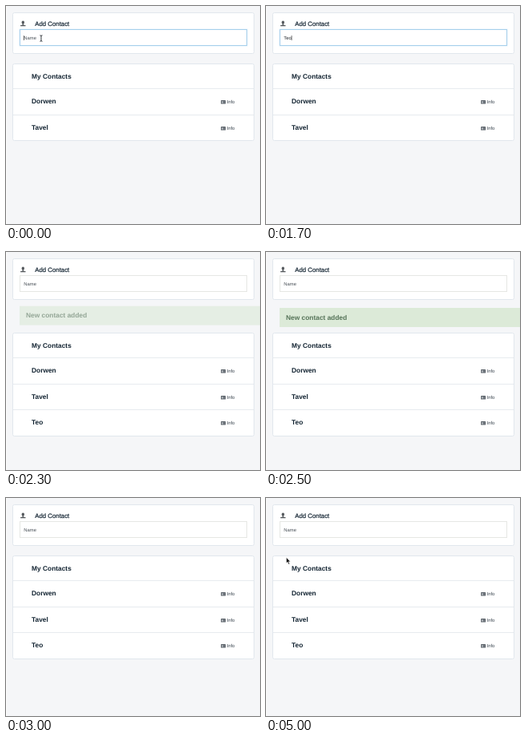
Recreate the animation shown at these times as an HTML page. Size 318 by 273 pixels, loop 5100 ms.

```html
<!DOCTYPE html>
<html lang="en">
<head>
<meta charset="utf-8">
<title>Add contact</title>
<style>
  html, body { margin: 0; width: 100%; height: 100%; overflow: hidden; background: #f5f6f8; }
  svg { display: block; width: 318px; height: 273px; }
  text { font-family: "Liberation Sans", Arial, sans-serif; fill: #132432; text-rendering: geometricPrecision; }
  .bold { font-size: 8.4px; font-weight: 700; }
  .small { font-size: 5.9px; fill: #3c4650; }
  .card { fill: #fff; stroke: #e1e7ed; }
  .rule { stroke: #e7ebef; }
</style>
</head>
<body>
<svg viewBox="0 0 318 273">
  <defs>
    <g id="info">
      <rect x="269" y="118" width="6" height="4.6" rx=".4" fill="#596067"/>
      <path d="M270 119.4h1.6v1.9h-1.6zM272.4 119.7h1.8M272.4 121.100h1.8" fill="#b4babf" stroke="#c8cdd2" stroke-width=".4"/>
      <text class="small" x="276.500" y="122.400">Info</text>
    </g>
  </defs>
  <rect width="318" height="273" fill="#f5f6f8"/>
  <rect width="1" height="273" fill="#fcfcfc"/>

  <rect class="card" x="8.500" y="8.500" width="302" height="51" rx="2"/>
  <ellipse cx="21.300" cy="20.600" rx="1.700" ry="2" fill="#55595d"/>
  <path d="M20.700 22h1.200l.3 1.900h2.300v1.300h-6.400v-1.300h2.300z" fill="#55595d"/>
  <text x="36.300" y="24.900" font-size="7.800" stroke="#132432" stroke-width=".2">Add Contact</text>
  <rect id="glow" x="17.500" y="29.500" width="284" height="20" fill="none" stroke="#a9d6f5" stroke-width="2" opacity=".3"/>
  <rect id="field" x="17.500" y="29.500" width="284" height="20" fill="#fff"/>
  <text id="value" class="small" x="22.300" y="41.900"></text>
  <path id="caret" d="M0 37v6" stroke="#333" stroke-width=".7"/>

  <g id="banner">
    <rect x="17" y="70" width="301" height="24" fill="#dcead8"/>
    <text class="bold" x="25" y="84.600" style="fill:#557358">New contact added</text>
  </g>

  <g id="list">
    <rect id="panel" class="card" x="8.500" y="72.500" width="302" rx="2"/>
    <text class="bold" x="32" y="91.100">My Contacts</text>
    <g id="rows"></g>
  </g>

  <path id="beam" d="M42.500 36.700q1.500 0 1.500 1 0-1 1.500-1M44 37.500v6M42.500 44.300q1.500 0 1.500-1 0 1 1.500 1" fill="none" stroke="#20262c" stroke-width=".9"/>
  <path id="arrow" d="M25.500 74.600v7l1.600-1.500 1.200 2.800 1.200-.5-1.200-2.700h2.100z" fill="#111" stroke="#fff" stroke-width=".4"/>
</svg>
<script>
const LOOP = 5100, STEP = 100;
const KEYS = [1200, 1400, 1600];
const SENT = 1900, ADDED = 2100, CLEARED = 3000;
const people = ["Dorwen", "Tavel", "Teo"];
const el = id => document.getElementById(id);
const set = (id, name, v) => el(id).setAttribute(name, v);
const show = (id, on) => set(id, "visibility", on ? "visible" : "hidden");
const ramp = (t, from, to) => Math.max(0, Math.min(1, (t - from) / (to - from)));

el("rows").innerHTML = people.map((name, i) => {
  const y = Math.round(i * 32.5);
  return `<g id="row${i}" transform="translate(0 ${y})">
    <path class="rule" d="M9 103.5h301"/>
    <text class="bold" x="32" y="122">${name}</text>
    <use href="#info"/></g>`;
}).join("");

function draw(t) {
  const focused = t < SENT;
  const typed = focused ? KEYS.filter(k => t >= k).length : 0;
  const value = el("value");
  value.textContent = typed ? people[2].slice(0, typed) : "Name";
  value.style.fill = typed ? "#20262c" : "#4a5158";
  const end = typed ? 22.6 + value.getComputedTextLength() : 22.4;
  set("caret", "transform", `translate(${end} 0)`);
  show("caret", focused && (typed || t % 1000 < 500));
  show("beam", t < KEYS[0]);
  show("glow", focused);
  set("field", "stroke", focused ? "#a6cfeb" : "#e6e7e4");

  const added = t >= ADDED;
  const open = added && t < CLEARED;
  const alpha = open ? ramp(t, 2100, 2430) * (1 - ramp(t, 2700, 3000)) : 0;
  set("banner", "opacity", alpha);
  set("banner", "transform", `translate(0 ${-6 * (1 - alpha)})`);
  set("list", "transform", `translate(0 ${open ? 29 : 0})`);
  set("panel", "height", added ? 129 : 96);
  show("row2", added);
  show("arrow", t >= 4900);
}

function tick() {
  const t = performance.now() % LOOP;
  draw(Math.floor(t / STEP) * STEP);
  requestAnimationFrame(tick);
}
tick();
</script>
</body>
</html>
```
